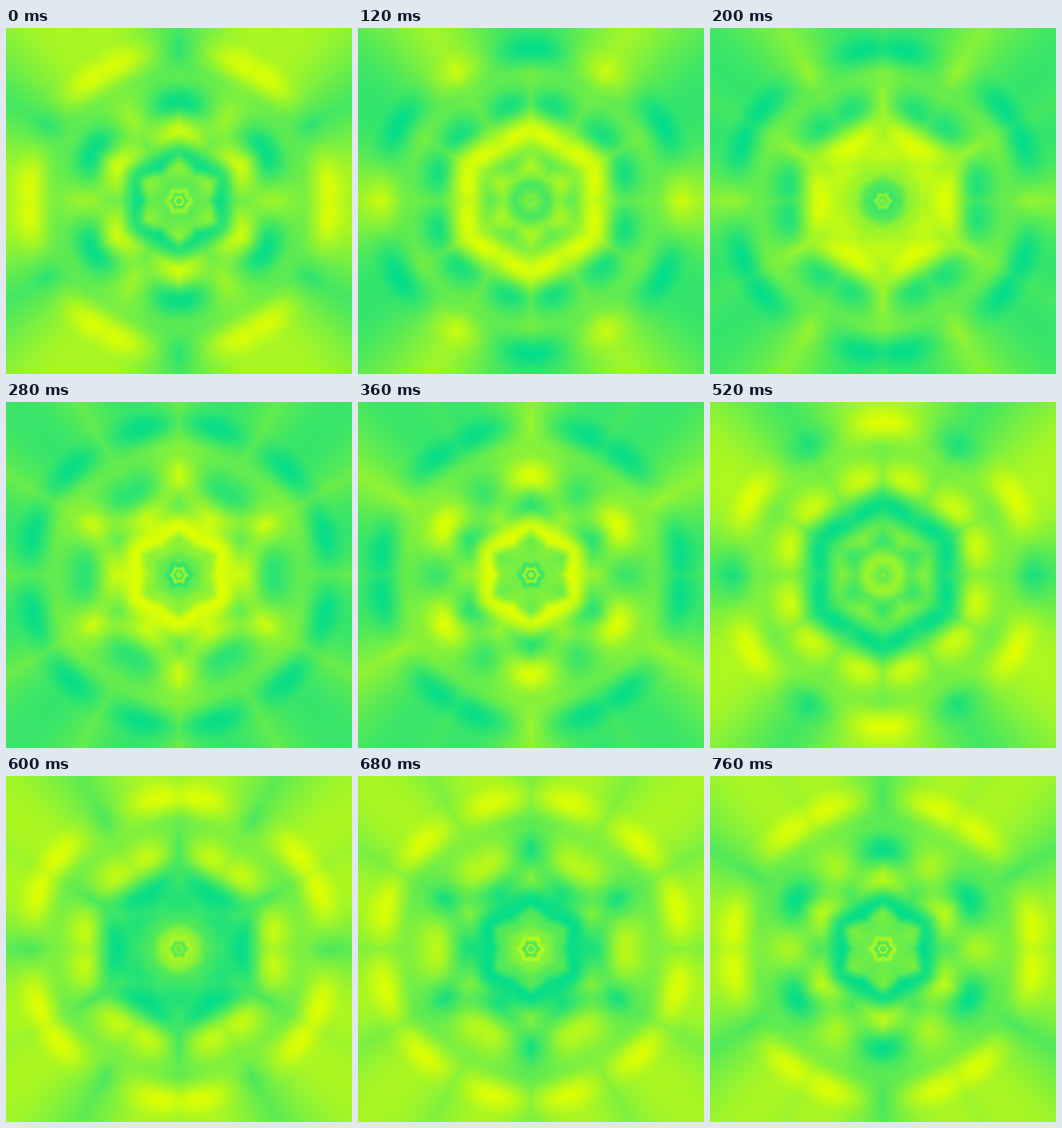
An HTML page with a canvas that plays this animation: 500x500 px, repeating every 0.8 s.

```html
<!DOCTYPE html>
<html>
<head>
<meta charset="utf-8">
<style>
  html, body { margin: 0; overflow: hidden; }
  canvas { display: block; }
</style>
</head>
<body>
<canvas id="stage" width="500" height="500"></canvas>
<script>
const SIZE = 500, LOOP = 800, STEP = 40, TAU = 2 * Math.PI;
const TEAL = [0, 220, 140], YELLOW = [225, 255, 0];

// Each ring: radius, amplitude and phase on the wedge's first edge (0°) and last edge (30°).
const rings = [
  [0, 0, .2, .2, .5, .5],
  [3, 3, .3, .3, .45, .45],
  [6, 5, .5, .5, .95, .95],
  [10, 8, .4, .4, .4, .4],
  [17, 12, .6, .6, .85, .85],
  [24, 20, .35, .35, .68, .68],
  [38, 50, .25, .5, .3, .18],
  [57, 70, 1, .95, .42, .36],
  [88, 102, .95, .92, .26, .08],
  [135, 144, .6, .95, .86, .44],
  [178, 180, .12, .2, .9, .4],
  [216, 221, .9, .97, 1.06, .64],
  [250, 250, .5, .55, 1.06, .62],
  [400, 400, .45, .5, 1.06, .6]
];

const mix = (a, b, k) => a + (b - a) * k;
const smooth = k => k * k * (3 - 2 * k);

const ctx = document.getElementById('stage').getContext('2d');
const image = ctx.createImageData(SIZE, SIZE);
const cosPart = new Float32Array(SIZE * SIZE);
const sinPart = new Float32Array(SIZE * SIZE);

// Fold every pixel into one mirrored 30° wedge and store its oscillation.
for (let i = 0; i < SIZE * SIZE; i++) {
  const x = i % SIZE + .5 - SIZE / 2, y = Math.floor(i / SIZE) + .5 - SIZE / 2;
  const r = Math.hypot(x, y);
  const sector = Math.atan2(y, x) / (TAU / 6);
  const u = 2 * Math.abs(sector - Math.round(sector));
  const radius = ring => mix(ring[0], ring[1], u);
  let n = 1;
  while (radius(rings[n]) < r) n++;
  const inner = rings[n - 1], outer = rings[n];
  const k = smooth((r - radius(inner)) / (radius(outer) - radius(inner)));
  for (const [ring, weight] of [[inner, 1 - k], [outer, k]]) {
    const amp = weight * mix(ring[2], ring[3], u);
    const phase = TAU * mix(ring[4], ring[5], u);
    cosPart[i] += amp * Math.cos(phase);
    sinPart[i] += amp * Math.sin(phase);
  }
}

function draw() {
  const t = Math.floor(performance.now() % LOOP / STEP) * STEP / LOOP;
  const c = Math.cos(TAU * t), s = Math.sin(TAU * t), data = image.data;
  for (let i = 0; i < SIZE * SIZE; i++) {
    const v = (1 + c * cosPart[i] + s * sinPart[i]) / 2;
    for (let ch = 0; ch < 3; ch++) data[4 * i + ch] = mix(TEAL[ch], YELLOW[ch], v);
    data[4 * i + 3] = 255;
  }
  ctx.putImageData(image, 0, 0);
  requestAnimationFrame(draw);
}
draw();
</script>
</body>
</html>
```
